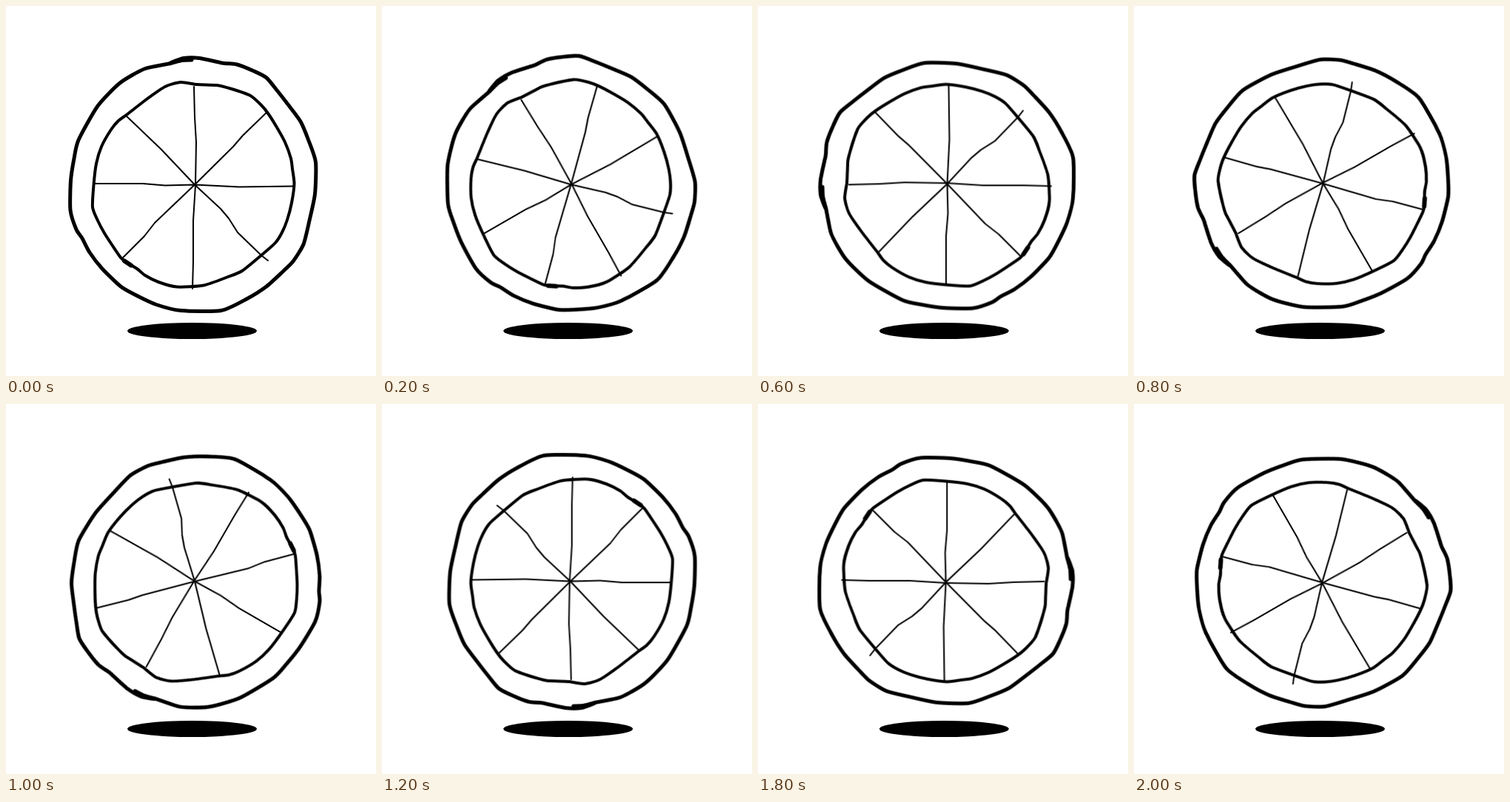
An HTML page for the animation above (2.1 s loop, 500x500 px).

```html
<!DOCTYPE html>
<html lang="en">
<head>
<meta charset="utf-8">
<title>Rolling wheel</title>
<style>
  html, body { margin: 0; width: 100%; height: 100%; overflow: hidden; background: #fff; }
  svg { display: block; width: 100%; height: 100%; }
  .wheel {
    fill: none;
    stroke: #000;
    stroke-linecap: round;
    stroke-linejoin: round;
    transform-origin: 254.8px 240.6px;
    animation: roll 2100ms steps(21, end) infinite;
  }
  .tyre { stroke-width: 5; }
  .rim { stroke-width: 4; }
  .knot { stroke-width: 6; }
  .spokes { stroke-width: 2; }

  /* 15 degrees per step; the last step leads back to the start */
  @keyframes roll {
    to { transform: rotate(-315deg); }
  }
</style>
</head>
<body>
<svg viewBox="0 0 500 500">
  <ellipse cx="251.5" cy="439" rx="87.5" ry="11"/>
  <g class="wheel">
    <path class="tyre" data-points="222,77 240,70.5 262,70.5 292,77 312,79 335,88 352,97 367,115 381,133
      398,156 409,182 418.5,211 417.5,254 410,290 402,322 388,345 374,359 352,379 325,396 291,411.5
      236,411.5 203,403.5 176,391 155,379 130,355 113,333 103,314 95,302 87,276 87.5,236 92,206
      98,181 124,135 154,104 187,85 220,78 238,73.5 251,73"/>
    <path class="rim" data-points="155,340 144,324 133,307 124,290 117,272 118.5,242 122,213 129,190
      142,167 152,155 163,147 190,126 215,109 236,103 258,106 284,107 303,111.5 330,121 345,134
      354,145 366,164 377,184 385,206 387,220 389.5,240 386,266 380,289 373,306 364,320 346,336
      319,358 300,366 267,377.5 231,379.5 206,373 188,364 177,355 162,346 155,340"/>
    <path class="knot" d="M160 344.500 L169 350.500"/>
    <g class="spokes">
      <path d="M254 109 L255 150 L257 184 L256 242 L253 290 L253 345 L252 382"/>
      <path d="M352 144 L320 175 L307 190 L255 241.500 L201 293 L187 311 L158 340"/>
      <path d="M390 243.500 L315 244.500 L255 241.500 L215 242.500 L185 240 L120 240"/>
      <path d="M163 149 L210 194 L255 241.500 L290 274 L301 287 L313 306 L345 337 L354 344"/>
    </g>
  </g>
</svg>
<script>
  const BEND = 0.11;

  // Softly bent line through the points; a repeated end point closes the loop.
  function handLine(points) {
    const last = points.length - 1;
    const closed = String(points[0]) === String(points[last]);
    const at = i => {
      if (i < 0) return points[closed ? last - 1 : 0];
      if (i > last) return points[closed ? 1 : last];
      return points[i];
    };
    const handle = (i, side) =>
      at(i).map((v, axis) => v + side * BEND * (at(i + 1)[axis] - at(i - 1)[axis]));
    let d = `M${points[0]}`;
    for (let i = 0; i < last; i++) {
      d += `C${handle(i, 1)} ${handle(i + 1, -1)} ${points[i + 1]}`;
    }
    return d;
  }

  for (const path of document.querySelectorAll("[data-points]")) {
    const points = path.dataset.points.trim().split(/\s+/).map(p => p.split(",").map(Number));
    path.setAttribute("d", handLine(points));
  }
</script>
</body>
</html>
```
